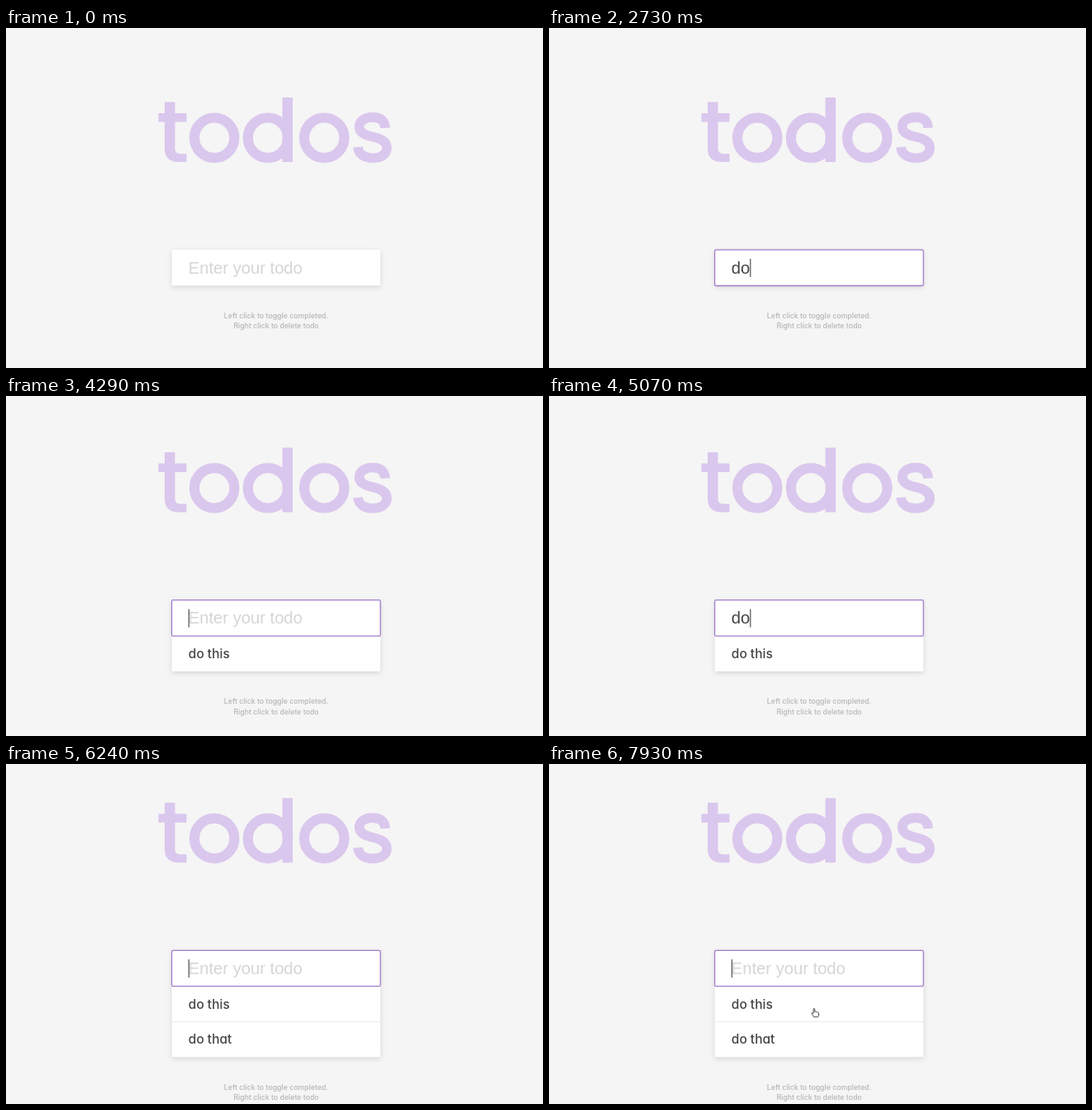
Write an HTML page that moves like this. It is 650x411 px and loops after 8000 ms.

```html
<!DOCTYPE html>
<html lang="en">
<head>
<meta charset="utf-8">
<title>todos</title>
<style>
  html, body { margin: 0; width: 100%; height: 100%; overflow: hidden; background: #f5f5f5; }
  svg { display: block; }
  .field { font: 20.2px "Liberation Sans", Arial, sans-serif; }
  .item { font: 500 15.5px Inter, sans-serif; font-feature-settings: "cv11"; fill: #444; }
  .hint { font: 500 8.75px Inter, sans-serif; fill: #b5b5b5; text-anchor: middle; }
  text { white-space: pre; }
  #card { fill: #fff; filter: drop-shadow(0 2.7px 3.3px rgba(0, 0, 0, .13)); }
</style>
</head>
<body>
<svg width="650" height="411" viewBox="0 0 650 411">
  <g id="title" role="img" aria-label="todos" fill="#dac7ed">
    <path d="M192 89.5H204.5V103H218.5V113.5H204.5V145.5Q204.5 152 211 152H218.5V162H209.5Q192 162 192 145.5V113.5H184.5V103H192Z"/>
    <path d="M334.5 84H347V162H334.5Z"/>
    <g fill="none" stroke="#dac7ed" stroke-width="12.2">
      <circle cx="252.2" cy="132.7" r="24.2"/>
      <circle cx="317" cy="132.7" r="24.2"/>
      <circle cx="385.2" cy="132.7" r="24.2"/>
      <path stroke-width="11.6" d="M459 120.8C458.6 112 453 107.9 444 107.9C434 107.9 427.6 112.5 427.6 119.4C427.6 126.5 434 129.4 443.5 131.4C454 133.7 461 137 461 145C461 152.5 454 157.2 444 157.2C434 157.2 426.6 152.5 426 144"/>
    </g>
  </g>
  <rect id="card" x="200.7" width="252.4"/>
  <g id="form">
    <text id="field" class="field" x="220.8" y="28.6"></text>
    <rect id="caret" y="11" width="1.1" height="22" fill="#444"/>
    <rect id="focus" x="200.6" y=".1" width="252.6" height="43.4" rx="1.6" fill="none" stroke="#a27cca" stroke-width="1.3"/>
    <g id="list">
      <g><text class="item" x="220.8" y="70.4">do this</text></g>
      <g>
        <path d="M200.7 86.2H453.1" stroke="#ebebeb"/>
        <text class="item" x="220.8" y="113.2">do that</text>
      </g>
    </g>
  </g>
  <g id="hints">
    <text class="hint" x="327" y="350.8">Left click to toggle completed.</text>
    <text class="hint" x="327" y="363.3">Right click to delete todo</text>
  </g>
  <g id="beam" fill="none" stroke="#555" stroke-width="1">
    <path stroke="#fff" stroke-width="2.2" opacity=".7" d="M0-4V4"/>
    <path d="M-2.2-5Q0-5 0-3.6V3.6Q0 5-2.2 5M2.2-5Q0-5 0-3.6V3.6Q0 5 2.2 5M-1.3 1.4H1.3"/>
  </g>
  <path id="arrow" fill="#111" stroke="#fff" stroke-width=".8" d="M0 0V10L2.4 7.8L4 11.4L5.6 10.7L4 7.2H7.2Z"/>
  <path id="hand" fill="#fff" stroke="#333" stroke-width=".9" stroke-linejoin="round"
    d="M-1.9 1V-4.1Q-1.9-5-1.1-5T-.3-4.1V-1Q.9-1.7 1.4-.7Q2.6-1.3 3-.2Q4.4-.5 4.5 1V2.6Q4.5 4 3.5 5.3H-1.3Q-2.2 3.4-4 1.6Q-4.4.4-3.2.3Z"/>
</svg>
<script>
  const LOOP = 8000, STEP = 130, BLINK = 520;
  const ROW = 42.8, TOP = 268, FIELD_H = 43.4, TEXT_X = 220.8;
  const FOCUS_AT = 650;
  const $ = id => document.getElementById(id);
  const show = (el, on) => el.setAttribute("visibility", on ? "visible" : "hidden");
  const move = (el, x, y) => el.setAttribute("transform", `translate(${x} ${y})`);

  // Each entry: text, key times, time of Enter
  const entries = [
    { text: "do this", keys: [2600, 2730, 3250, 3380, 3640, 3900, 4030], enter: 4290 },
    { text: "do that", keys: [4940, 5070, 5330, 5460, 5590, 5720, 5850], enter: 6240 }
  ];
  // The blink restarts on focus and on every key
  const resets = [FOCUS_AT, ...entries.flatMap(e => e.keys)];

  const typedAt = t => {
    const entry = entries.find(e => t < e.enter);
    return entry ? entry.text.slice(0, entry.keys.filter(k => k <= t).length) : "";
  };

  const caretOn = t => {
    const since = t - resets.filter(r => r <= t).pop();
    return since >= 0 && Math.floor(since / BLINK) % 2 === 0;
  };

  function pointerAt(t) {
    if (t >= 130 && t < 2600) {
      const p = Math.min(3, Math.floor((t - 130) / STEP)) / 3;
      const y = 346 - 50 * p * (2 - p);
      const kind = y > 340 || y < 311 ? "beam" : "arrow";
      return { kind, x: 305 - 6 * p, y };
    }
    if (t >= 7150) {
      const p = Math.min(3, Math.floor((t - 7150) / STEP)) / 3;
      return { kind: "hand", x: 299 + 23 * p, y: 296 + 4.5 * p };
    }
    return null;
  }

  function render(t) {
    const count = entries.filter(e => t >= e.enter).length;
    const shift = count * ROW / 2;
    const top = TOP - shift;
    const typed = typedAt(t);

    move($("title"), 0, -shift);
    move($("form"), 0, top);
    move($("hints"), 0, shift);
    $("card").setAttribute("y", top);
    $("card").setAttribute("height", FIELD_H + count * ROW);
    [...$("list").children].forEach((row, i) => show(row, i < count));

    const field = $("field");
    field.textContent = typed || "Enter your todo";
    field.setAttribute("fill", typed ? "#444" : "#d5d5d5");
    $("caret").setAttribute("x", TEXT_X + (typed ? field.getComputedTextLength() : 0));
    show($("caret"), caretOn(t));
    show($("focus"), t >= FOCUS_AT);

    const pointer = pointerAt(t);
    for (const kind of ["beam", "arrow", "hand"]) {
      const on = pointer !== null && pointer.kind === kind;
      show($(kind), on);
      if (on) move($(kind), pointer.x, pointer.y);
    }
  }

  const start = performance.now();
  function tick() {
    render((performance.now() - start) % LOOP);
    requestAnimationFrame(tick);
  }
  tick();
</script>
</body>
</html>
```
